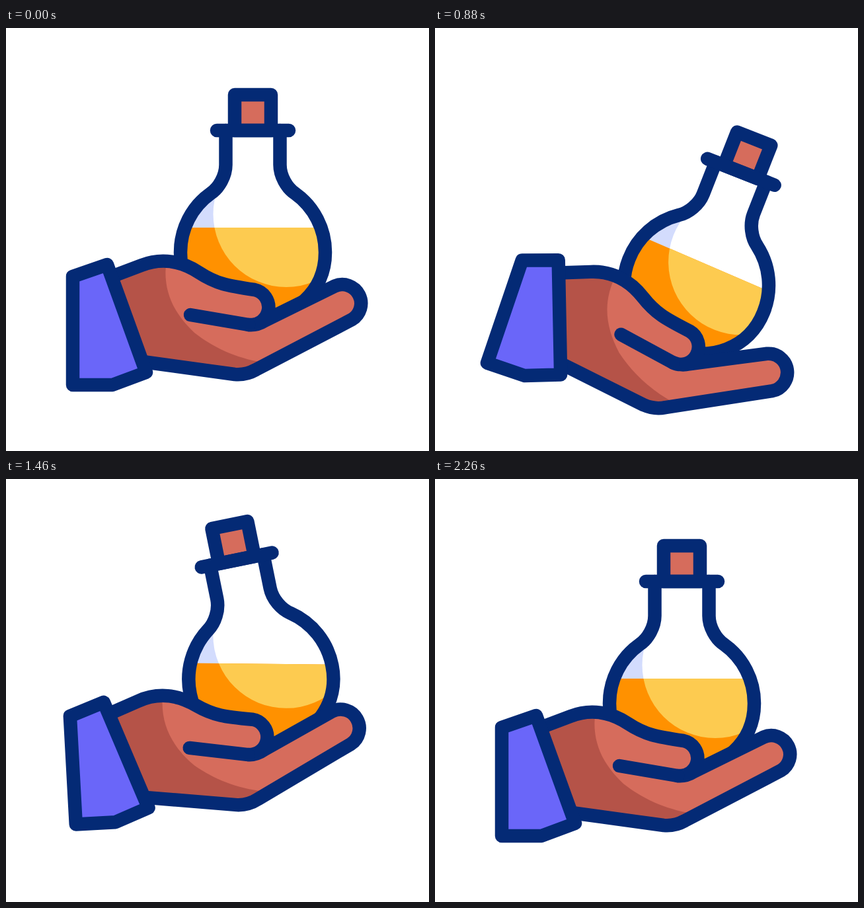
Animation, 640 px wide and 640 px high, one loop 2.4 s. Source, as an HTML page:

```html
<!DOCTYPE html>
<html lang="en">
<head>
<meta charset="utf-8">
<title>Potion toss</title>
<style>
  html, body { margin: 0; width: 100%; height: 100%; overflow: hidden; background: #fff; }
  svg { display: block; width: 100%; height: 100%; }
  .line { fill: none; stroke: #042a75; stroke-width: 20.5; stroke-linecap: round; stroke-linejoin: round; }
</style>
</head>
<body>
<svg viewBox="0 0 640 640">
  <defs>
    <path id="glass" d="M332.5 155V207C332.5 224 322 242 310 250A109.5 109.5 0 0 0 264 340C264 398 311 441 373.5 441S483 398 483 340A109.5 109.5 0 0 0 437 250C425 242 414.5 224 414.5 207V155"/>
    <path id="palm" d="M160 376L205 359C236 347 266 353 292 370C318 387 335 390 376 396A26.9 26.9 0 0 1 367 449Q380 450 391 443L497.4 390.5A28.5 28.5 0 0 1 523.2 441.2L378 517Q363 525.5 346 524L200 504"/>
    <clipPath id="inGlass"><use href="#glass"/></clipPath>
    <clipPath id="inPalm"><use href="#palm"/></clipPath>
    <clipPath id="inLiquid"><rect id="level" x="173" y="302" width="400" height="300"/></clipPath>
  </defs>

  <g id="flask">
    <g clip-path="url(#inGlass)">
      <rect x="250" y="150" width="250" height="310" fill="#d3dcfd"/>
      <circle cx="424" cy="281.5" r="110.5" fill="#fff"/>
      <rect x="300" y="150" width="150" height="105" fill="#fff"/>
      <g clip-path="url(#inLiquid)">
        <rect x="250" y="220" width="250" height="240" fill="#ff9100"/>
        <circle cx="424" cy="281.5" r="110.5" fill="#fdcb50"/>
      </g>
    </g>
    <use href="#glass" class="line"/>
    <path class="line" d="M346 155V101H401V155Z" style="fill:#d66c5c"/>
    <path class="line" d="M319 155H428"/>
  </g>

  <g id="hand">
    <g clip-path="url(#inPalm)">
      <rect x="140" y="330" width="420" height="210" fill="#b55348"/>
      <path fill="#d66c5c" d="M243 350C236 395 252 430 285 461C313 483 347 499 388 506H600V330Z"/>
    </g>
    <use href="#palm" class="line"/>
    <path class="line" d="M279 434L367 449"/>
    <path class="line" d="M101 376L153 358L212 521L161 540H101Z" style="fill:#6a66f9"/>
  </g>
</svg>
<script>
const LOOP = 2400;
const BEATS = [0, 440, 890, 1270, 1730, 2050, 2300];
const LEAD = 180;
const WRIST = [200, 455];
const BULB = [373.5, 340];

const ease = u => (1 - Math.cos(Math.PI * u)) / 2;

// Eases from rest through one peak per beat and back to rest.
function swing(lead, ...peaks) {
  const times = BEATS.map(b => Math.max(0, b - lead));
  const values = [0, ...peaks, 0];
  return t => {
    const i = times.findIndex(end => t < end);
    if (i < 1) return 0;
    const u = (t - times[i - 1]) / (times[i] - times[i - 1]);
    return values[i - 1] + (values[i] - values[i - 1]) * ease(u);
  };
}

const handTurn = swing(0, -18.2, 18.8, -7.5, 4.4, 0);
const handDrop = swing(LEAD, 41.5, -31, 50, -30, 11);

// The flask moves loosely in the hand, the liquid loosely in the flask.
const looseTurn = swing(LEAD, -4.2, -4.8, 13, -10.5, 5);
const looseX = swing(LEAD, 1, 12.5, -31.5, 24, -12);
const looseY = swing(LEAD, -20, -48, 30, -7.5, 20);
const tilt = swing(LEAD, 6.5, 8.3, -7, 14, -13.5);

const [hand, flask, level] = ["hand", "flask", "level"].map(id => document.getElementById(id));
const set = (el, value) => el.setAttribute("transform", value);

function draw(t) {
  const turn = handTurn(t), drop = handDrop(t), slosh = tilt(t);
  set(hand, `translate(0 ${drop}) rotate(${turn} ${WRIST})`);

  const a = turn * Math.PI / 180, c = Math.cos(a), s = Math.sin(a);
  const dx = BULB[0] - WRIST[0], dy = BULB[1] - WRIST[1];
  const x = WRIST[0] + dx * c - dy * s + looseX(t);
  const y = WRIST[1] + dx * s + dy * c + drop + looseY(t);
  set(flask, `translate(${x} ${y}) rotate(${turn + looseTurn(t)}) translate(${-BULB[0]} ${-BULB[1]})`);

  set(level, `translate(0 ${Math.abs(slosh) * 1.1}) rotate(${slosh} ${BULB[0]} 302)`);
}

const start = performance.now();
function tick() {
  draw((performance.now() - start) % LOOP);
  requestAnimationFrame(tick);
}
draw(0);
requestAnimationFrame(tick);
</script>
</body>
</html>
```
